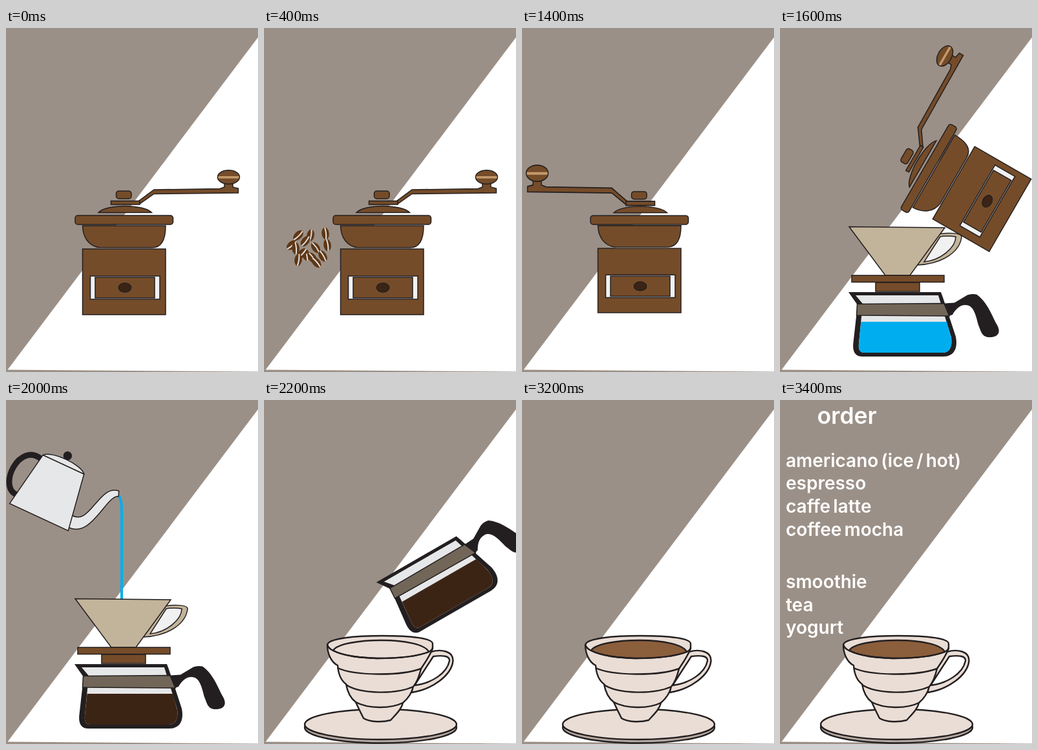
An HTML page that plays this animation: 390x534 px, repeating every 3800 ms.

```html
<!DOCTYPE html>
<html lang="en">
<head>
<meta charset="utf-8">
<title>Coffee</title>
<style>
  html, body { margin: 0; width: 100%; height: 100%; overflow: hidden; background: #9b9087; }
  svg { display: block; width: 390px; height: 534px; }
  .line { stroke: #231f20; stroke-width: 1.5; }
  .wood { fill: #754c29; }
  .dark { fill: #231f20; }
  #cup { fill: #e9ddd5; stroke: #231f20; stroke-width: 2.4; stroke-linejoin: round; }
  #menu { fill: #fff; font: 600 28px Inter, "Open Sans", sans-serif; word-spacing: -3px; }
  #menu .title { font-size: 35.5px; }
  .part { display: none; }
</style>
</head>
<body>
<svg viewBox="0 0 390 534">
  <rect width="390" height="534" fill="#9b9087"/>
  <path d="M390 14.500L2.500 530.500L390 533.500Z" fill="#fff"/>

  <g id="cup" class="part">
    <ellipse cx="180.500" cy="508.500" rx="117.500" ry="24" fill="#b3a8a1"/>
    <ellipse cx="180.500" cy="503.500" rx="117.500" ry="23.500"/>
    <path fill-rule="evenodd" d="M258 391C275 386 293 390 292.500 405C290 428 260 449 229 454L230 440Z
      M262 398C276 396 288 397 287 405C283 425 258 440 233 443Z"/>
    <path d="M98 380C100 370 140 366 183 366C230 366 262 370 261 379V386C255 400 247 411 243 417
      C240 430 236 439 231 445C228 457 221 465 215 470C213 480 204 488 196 497C185 500 165 501 154 494
      C151 488 146 478 142 469C134 463 129 453 127 441C120 436 115 426 114 412C104 407 98 394 98 380Z"/>
    <path id="brew" d="M107 389C112 379 145 373 182 373C220 373 250 380 255 391C240 397 215 401 175 401C150 400 125 398 107 389Z"/>
    <path fill="none" d="M98 380Q100 386 107 389C125 398 150 400 175 401C215 401 240 397 255 391Q261 388 261 384
      M114 416C140 428 210 429 243 417M127 442C150 457 205 457 231 445M142 469C160 479 195 480 215 470"/>
  </g>

  <g id="kettle" class="part">
    <path d="M173 146C178 152 179 160 179 170V309" fill="none" stroke="#00aeef" stroke-width="4"/>
    <g transform="translate(0 -29) rotate(25 70 170)" class="line" fill="#e6e7e8">
      <path d="M36 132C-8 120 -8 200 24 198" fill="none" stroke-width="9" style="stroke-width:9"/>
      <path d="M112 190C148 200 132 128 165 126L168 134C150 138 158 214 116 210Z"/>
      <path d="M35 125H105L120 215H20Z"/>
      <path d="M35 125C45 113 95 113 105 125Z"/>
      <circle cx="70" cy="110" r="6" class="dark"/>
    </g>
  </g>

  <g id="pot" class="part">
    <path class="dark" d="M106 410H249L252 418L272 479C276 499 268 510 253 510H127C115 510 112 500 113.500 488L120 430Z"/>
    <path fill="#e6e7e8" d="M117 415H245L265 480C267 496 262 504 252 504H131C124 504 121 500 122 490L128 428Z"/>
    <path id="fluid" d="M125.500 456H258L265 481C267 496 262 504 252 504H131C124 504 121 500 122 490Z"/>
    <path class="line" fill="#726658" d="M119.500 428.500L254 427.500L262 447L118.500 446Z"/>
    <path class="dark" d="M253 427.500L270 426.500L290 414.500Q296 412 304 413.500C321 425 328 447 336 461
      C343 474 336 480 324 480C312 480 311 470 307 461C303 446 300 430 287 430C277 430 271 438 267 445L261.500 447Z"/>
  </g>

  <g id="dripper" class="part line">
    <path fill="#c2b49a" d="M244 320C256 318 281 317 281 324C279 345 255 366 212 368Z"/>
    <path fill="#f1f1f2" d="M248 324Q260 322 272 324C272 340 250 360 223 363Z"/>
    <path fill="#c2b49a" d="M107 308.500L255 310L201 384H163Z"/>
    <rect class="wood" x="148" y="395" width="68" height="14"/>
    <rect class="wood" x="111" y="384" width="143" height="10.500"/>
  </g>

  <g id="mill" class="part line wood">
    <rect x="118.500" y="343" width="128.500" height="102"/>
    <rect x="130.500" y="385" width="107.500" height="36" fill="#f1f1f2"/>
    <rect x="138" y="387" width="92" height="32"/>
    <ellipse cx="184" cy="403" rx="9.700" ry="7" fill="#3c2415"/>
    <path d="M118.500 307H247C247 327 242 341 226 341H146C128 339 119 325 118.500 307Z"/>
    <rect x="107" y="291" width="151.500" height="14" rx="4"/>
    <path d="M143 286.500C155 273 213 273 225.500 286.500Z"/>
    <rect x="170.500" y="253" width="23.500" height="12" rx="4"/>
  </g>

  <g id="arm" class="part line wood">
    <path d="M204 269.500L229 251L331 249.500L338 247V240H351V247L359.500 249V256L229 257.500L207 273Z"/>
    <rect x="162.500" y="268.500" width="44.500" height="5.500"/>
    <ellipse cx="344.500" cy="231.500" rx="17" ry="10.700"/>
    <path d="M328.500 231.700H360.500" style="stroke:#c49a6c;stroke-width:3.500"/>
  </g>

  <g id="beans" class="part"></g>

  <g id="menu" class="part">
    <text class="title" x="57.500" y="37">order</text>
    <text x="9" y="103.500">americano (ice / hot)</text>
    <text x="9" y="139">espresso</text>
    <text x="9" y="174.500">caffe latte</text>
    <text x="9" y="210.500">coffee mocha</text>
    <text x="9" y="291.500">smoothie</text>
    <text x="9" y="327.500">tea</text>
    <text x="9" y="363">yogurt</text>
  </g>
</svg>
<script>
const $ = id => document.getElementById(id);

// x, y, tilt
const beans = [
  [53, 322, 45], [72, 322, 10], [95, 319, -6], [43, 337, 50], [64, 331, 38],
  [49, 342, -4], [98, 337, -8], [80, 341, -35], [65, 352, -15], [59, 350, 42],
  [53, 360, 8], [91, 354, -30], [75, 357, -35], [81, 364, -40]
];
$('beans').innerHTML = beans.map(([x, y, a]) =>
  `<g transform="translate(${x} ${y}) rotate(${a})">
    <ellipse rx="5.800" ry="9.500" fill="#5e3716"/>
    <path d="M0-9.300Q2 0 0 9.300" fill="none" stroke="#e3dfdb" stroke-width="2"/>
  </g>`).join('');

const WATER = '#00aeef', COFFEE = '#3c2415';
const still = '';
const right = { mill: still, arm: still };
const left = { mill: 'matrix(1 0 0 .979 -1 6.300)', arm: 'matrix(-1 0 0 1.177 368 -47)' };
const tip = 'matrix(.5055 -.8756 .857 .495 -117.500 230.500)';
const pour1 = 'translate(-123 -19) rotate(-30)';
const pour2 = 'translate(-218 221) rotate(-60)';
const withBeans = (x, y) => ({ ...right, beans: `translate(${x} ${y})` });

// One scene per step: visible parts with their transforms
const STEP = 200, LOOP = 3800;
const scenes = [
  right,
  withBeans(-11, 133),
  withBeans(0, 0),
  withBeans(36, -90),
  withBeans(113, -65),
  left, right, left,
  { mill: tip, arm: tip, dripper: still, pot: still, fluid: WATER },
  { kettle: still, dripper: still, pot: still, fluid: WATER },
  { kettle: still, dripper: still, pot: still },
  { cup: still, pot: pour1 },
  { cup: still, pot: pour2 },
  { cup: still, pot: pour2, full: true },
  { cup: still, full: true },
  { cup: still, full: true, menu: still },
  { cup: still, full: true },
  { cup: still, full: true, menu: still }
];

const parts = [...document.querySelectorAll('.part')];
let shown = -1;

function show(i) {
  if (i === shown) return;
  shown = i;
  const scene = scenes[i];
  for (const part of parts) {
    const pose = scene[part.id];
    part.style.display = pose === undefined ? 'none' : 'inline';
    part.setAttribute('transform', pose || 'translate(0 0)');
  }
  $('fluid').setAttribute('fill', scene.fluid || COFFEE);
  $('brew').setAttribute('fill', scene.full ? '#8b5e3c' : '#e9ddd5');
}

const start = performance.now();
function tick() {
  const t = (performance.now() - start) % LOOP;
  show(Math.min(Math.floor(t / STEP), scenes.length - 1));
  requestAnimationFrame(tick);
}
tick();
</script>
</body>
</html>
```
